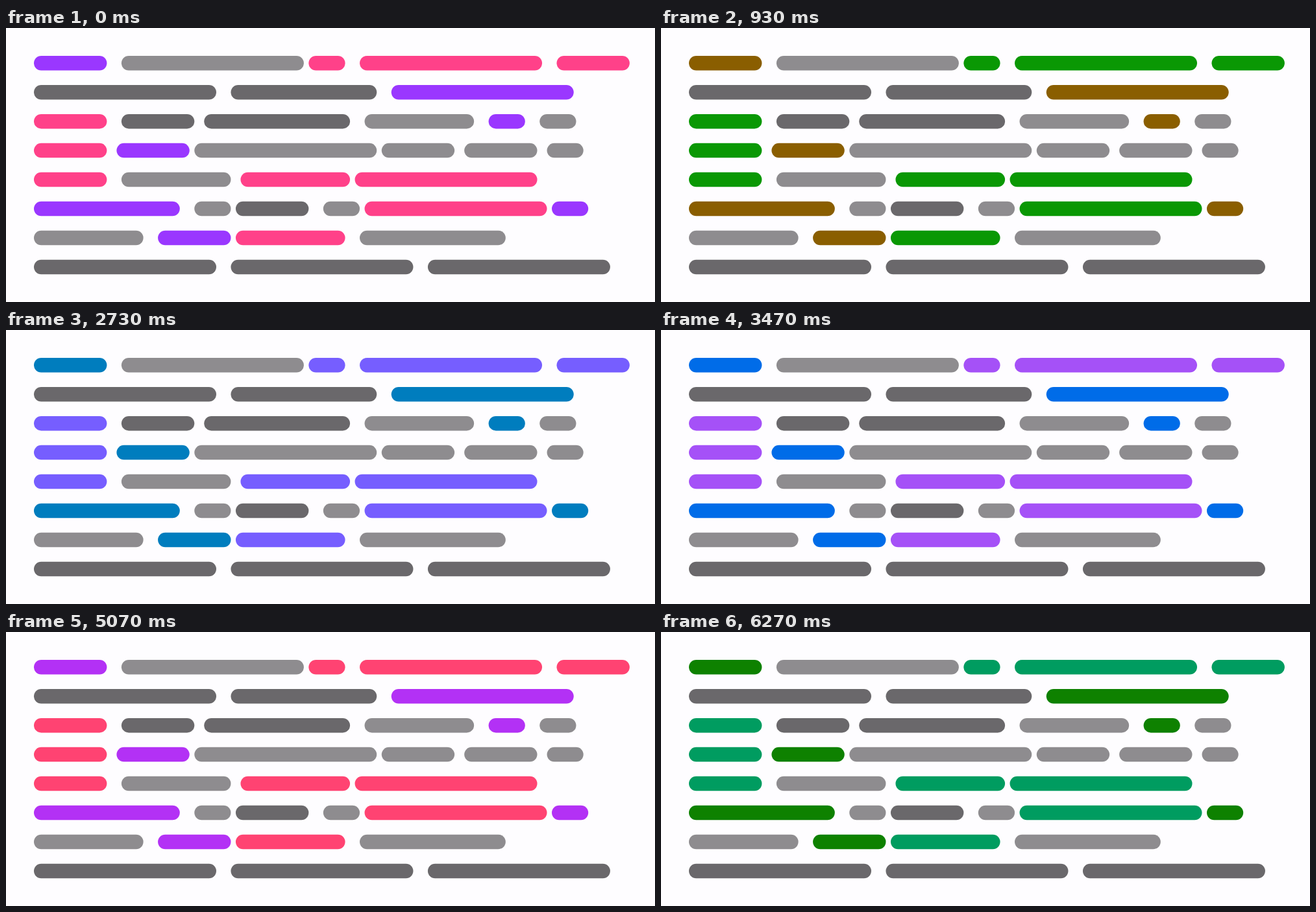
An HTML page for the animation above (6310 ms loop, 1000x423 px).

```html
<!DOCTYPE html>
<html lang="en">
<head>
<meta charset="utf-8">
<title>Code lines</title>
<style>
  html, body { margin: 0; width: 100%; height: 100%; overflow: hidden; background: #fefdff; }
  svg { display: block; width: 1000px; height: 423px; }
  .a { fill: #0066f4; }
  .b { fill: #b54df0; }
  .g { fill: #8e8c8f; }
  .d { fill: #6a686b; }
</style>
</head>
<body>
<svg viewBox="0 0 1000 423">
  <g id="plain"></g>
  <g id="tinted"></g>
</svg>
<script>
// Each bar: colour class, width in blocks, gap after it in units.
const LINES = [
  'a23 g51 b13 b53 b20',
  'd53 d43 a50',
  'b23 d22 d43 g33 a13 g10',
  'b22 a21 g51 g22 g22 g10',
  'b23 g32 b31 b50',
  'a43 g11 d23 g11 b51 a10',
  'g33 a21 b33 g40',
  'd53 d53 d50'
];
const UNIT = 7.493, BLOCK = 7.5 * UNIT, HEIGHT = 3 * UNIT, LEFT = 43, TOP = 43;
const LOOP = 6310, CYCLE = 5000, PHASE = 640, STEP = 100 / 3, LAST_STEP = 188;

const plain = document.getElementById('plain');
const tinted = document.getElementById('tinted');

function addBar(kind, x, y, width) {
  const bar = document.createElementNS('http://www.w3.org/2000/svg', 'rect');
  const attrs = { class: kind, x, y, width, height: HEIGHT, rx: HEIGHT / 2 };
  for (const name in attrs) bar.setAttribute(name, attrs[name]);
  ('ab'.includes(kind) ? tinted : plain).append(bar);
}

LINES.forEach((line, row) => {
  let x = LEFT;
  for (const [kind, blocks, gap] of line.split(' ')) {
    const width = blocks * BLOCK;
    addBar(kind, x, TOP + row * 2 * HEIGHT, width);
    x += width + gap * UNIT;
  }
});

const hue = tinted.animate(
  { filter: ['hue-rotate(0deg)', 'hue-rotate(360deg)'] },
  { duration: CYCLE, easing: 'ease', iterations: Infinity }
);
hue.pause();

// Thirty steps a second, each starting on a rounded 10 ms tick.
function show(time) {
  const tick = Math.floor(time / 10);
  const step = Math.min(LAST_STEP, Math.ceil(0.3 * (tick + 0.5)) - 1);
  hue.currentTime = PHASE + step * STEP;
}

const start = performance.now();
function frame() {
  show((performance.now() - start) % LOOP);
  requestAnimationFrame(frame);
}
frame();
</script>
</body>
</html>
```
